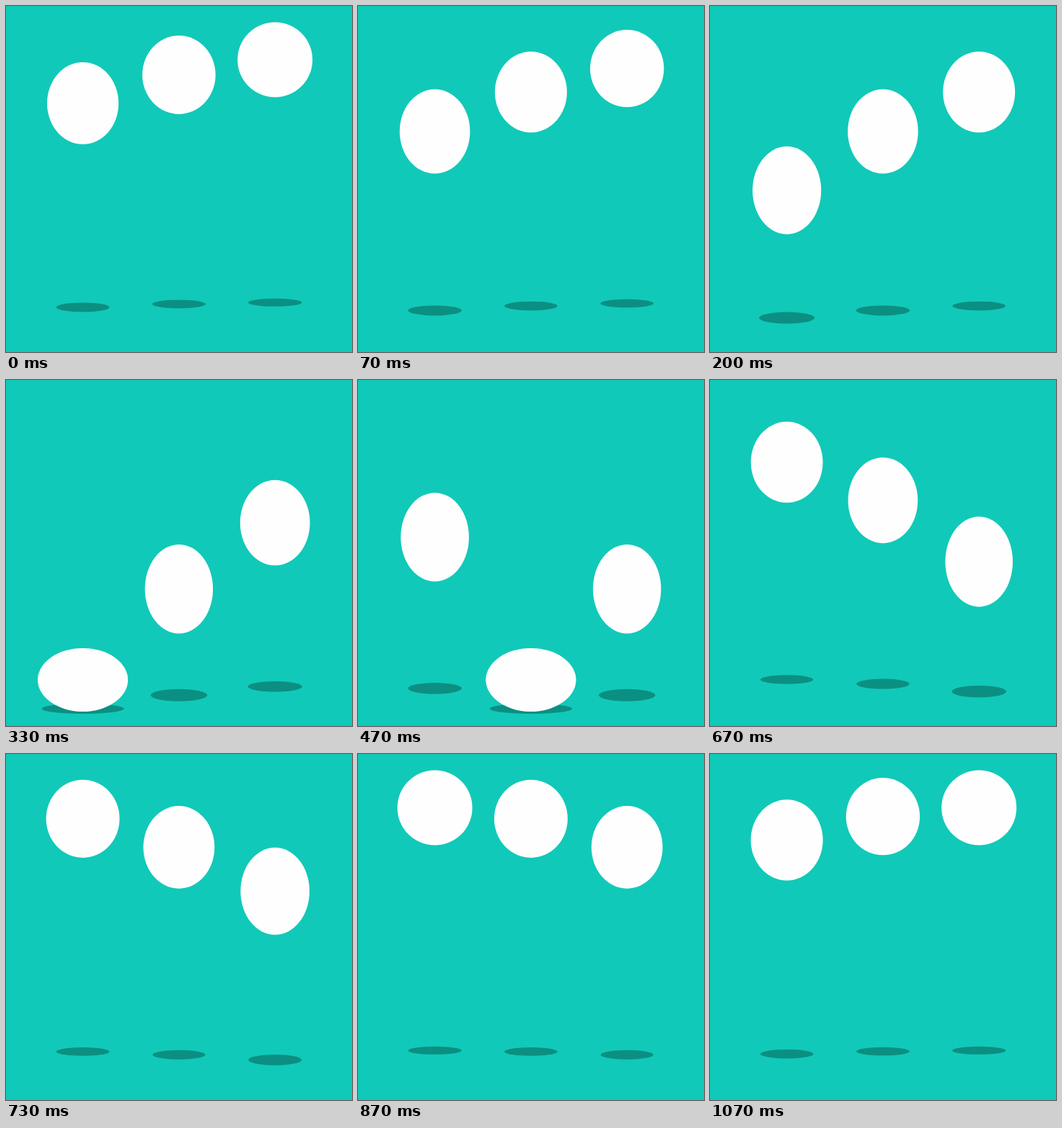
These frames come from a looping animation (480 by 480 pixels, 1.14 s). An HTML page with a canvas:

```html
<!DOCTYPE html>
<html lang="en">
<head>
<meta charset="utf-8">
<title>Bouncing balls</title>
<style>
  html, body { margin: 0; width: 100%; height: 100%; overflow: hidden; background: #11c9b8; }
  canvas { display: block; width: 100%; height: 100%; }
</style>
</head>
<body>
<canvas id="stage" width="480" height="480"></canvas>
<script>
const ctx = document.getElementById('stage').getContext('2d');
const LOOP = 1140;      // ms
const STEPS = 17;       // pictures shown per loop, 15 per second
const CYCLE = 28;       // animation ticks per bounce, 25 per second
const LAG = 3;          // ticks between neighbouring balls
const LAND = 16;        // tick of the deepest squash
const TOP = 74.5, DROP = 341.5;

const mix = (a, b, t) => a + (b - a) * t;
const clamp = t => Math.max(0, Math.min(1, t));

function bezier(x1, y1, x2, y2) {
  const at = (a, b, t) => 3 * a * t * (1 - t) ** 2 + 3 * b * t * t * (1 - t) + t ** 3;
  return x => {
    let lo = 0, hi = 1;
    for (let i = 0; i < 30; i++) {
      const mid = (lo + hi) / 2;
      if (at(x1, x2, mid) < x) lo = mid; else hi = mid;
    }
    return at(y1, y2, (lo + hi) / 2);
  };
}
const fall = bezier(1 / 3, 0.066, 2 / 3, 0.293);
const rise = bezier(0, 0.58, 0.667, 0.944);

// Height as a share of the drop: 0 at the top, 1 on the ground.
function depth(u) {
  return u <= LAND ? fall(clamp((u - 1) / 15)) : 1 - rise(clamp((u - LAND) / 12));
}

const ROUND = [52, 52], LONG = [46.8, 62.6], FLAT = [62.6, 44];
const KEYS = [[0, ROUND], [1, ROUND], [14, LONG], [LAND, FLAT], [18, LONG], [CYCLE, ROUND]];

function radii(u) {
  const i = KEYS.findIndex(key => key[0] > u);
  const [t0, a] = KEYS[i - 1], [t1, b] = KEYS[i];
  const t = (u - t0) / (t1 - t0);
  return [mix(a[0], b[0], t), mix(a[1], b[1], t)];
}

function oval(x, y, rx, ry, color) {
  ctx.fillStyle = color;
  ctx.beginPath();
  ctx.ellipse(x, y, rx, ry, 0, 0, Math.PI * 2);
  ctx.fill();
}

function drawBall(x, u) {
  const d = depth(u);
  const [rx, ry] = radii(u);
  const near = d / (d + 1.24 * (1 - d));   // perspective of the shadow
  oval(x, mix(411.3, 456, near), rx * mix(0.716, 0.91, near), ry * mix(0.106, 0.159, near), '#0b8f82');
  oval(x, TOP + DROP * d, rx, ry, '#fffeff');
}

const stepStart = k => Math.round(k * 20 / 3) * 10;

function draw(time) {
  let k = STEPS - 1;
  while (k > 0 && stepStart(k) > time) k--;
  const tick = Math.ceil(k * 5 / 3);
  ctx.fillStyle = '#11c9b8';
  ctx.fillRect(0, 0, 480, 480);
  for (let i = 0; i < 3; i++) {
    drawBall(106.6 + 133.3 * i, (tick + 7 - LAG * i) % CYCLE);
  }
}

const begin = performance.now();
function loop() {
  draw((performance.now() - begin) % LOOP);
  requestAnimationFrame(loop);
}
loop();
</script>
</body>
</html>
```
